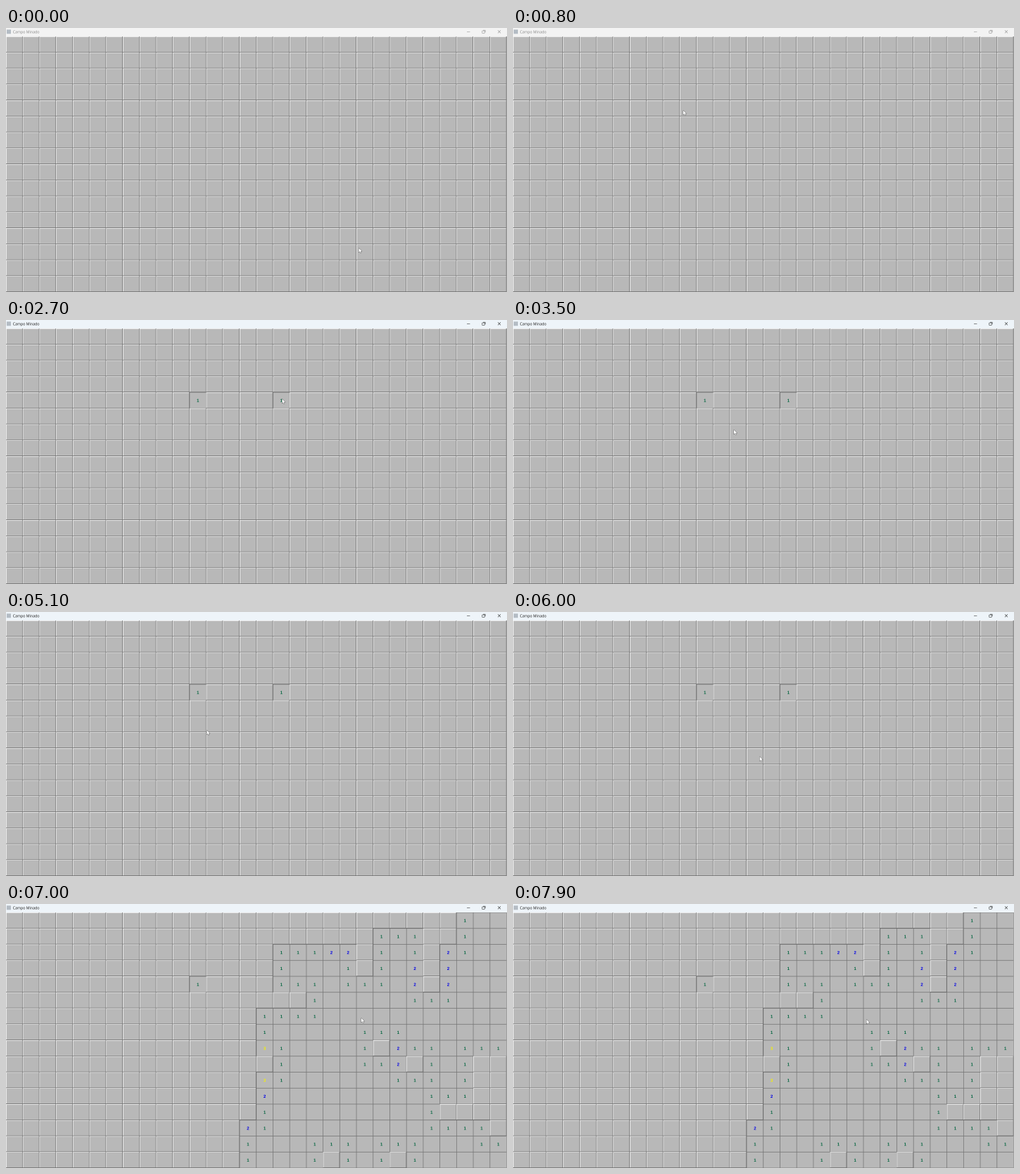
Recreate the animation shown at these times as an HTML page with a canvas. Size 712 by 376 pixels, loop 8 s.

```html
<!DOCTYPE html>
<html lang="pt">
<head>
<meta charset="utf-8">
<title>Campo Minado</title>
<style>
  html, body { margin: 0; width: 100%; height: 100%; overflow: hidden; background: #b8b8b8; }
  canvas { display: block; width: 712px; height: 376px; }
</style>
</head>
<body>
<canvas id="stage" width="712" height="376"></canvas>
<script>
const WIDTH = 712, HEIGHT = 376, DETAIL = 4;
const LOOP = 8000, TICK = 100;
const COLS = 30, ROWS = 16, TOP = 12;
const CW = 711.5 / COLS, CH = (HEIGHT - TOP) / ROWS;
const LINE = 0.371; // one screen pixel at the stage's scale
const DIGIT_COLORS = ['', '#00643e', '#0000e6', '#f6f200'];
const FOCUS_AT = 1000;

// Drawn large and scaled down, so hairlines blend like a shrunken screen recording.
const stage = document.getElementById('stage').getContext('2d');
stage.imageSmoothingQuality = 'high';
const large = document.createElement('canvas');
large.width = WIDTH * DETAIL;
large.height = HEIGHT * DETAIL;
const ctx = large.getContext('2d');
ctx.scale(DETAIL, DETAIL);

// Mines as "column,row"; all digits and the opened area follow from them.
const MINES = new Set(('23,0 18,1 20,1 26,1 15,2 10,3 21,3 25,3 25,4 17,5 14,7 22,8 ' +
  '14,9 15,9 24,9 28,9 14,10 14,12 26,12 29,13 13,14 19,15 23,15').split(' '));
const CLICKS = [
  { at: 1100, col: 11, row: 4 },
  { at: 2700, col: 16, row: 4 },
  { at: 7000, col: 21, row: 6 }
];

// Pointer tip at the turning points: [time, x, y]
const PATH = [
  [0, 501, 313], [100, 513, 301], [500, 121, 140], [700, 215, 115],
  [900, 268, 119], [1700, 268, 119], [2000, 355.5, 122], [2200, 402, 129],
  [2600, 392, 112], [3200, 392, 112], [3500, 313.5, 156], [3800, 272, 167],
  [4200, 270.5, 162.5], [5000, 270.5, 162.5], [5100, 285, 168], [5600, 415, 168],
  [6100, 334, 215], [6300, 385, 336], [6700, 501, 168], [6800, 504.5, 162],
  [7800, 504.5, 162], [7900, 502, 164], [LOOP, 502, 164]
];

function neighbours(col, row) {
  const cells = [];
  for (let r = Math.max(0, row - 1); r <= Math.min(ROWS - 1, row + 1); r++) {
    for (let c = Math.max(0, col - 1); c <= Math.min(COLS - 1, col + 1); c++) cells.push([c, r]);
  }
  return cells;
}

const countMines = (col, row) =>
  neighbours(col, row).filter(cell => MINES.has(cell.join())).length;

// Maps each opened cell to its digit.
function openCells(t) {
  const open = new Map();
  const reveal = (col, row) => {
    const key = [col, row].join();
    if (open.has(key)) return;
    const count = countMines(col, row);
    open.set(key, count);
    if (count === 0) neighbours(col, row).forEach(cell => reveal(...cell));
  };
  CLICKS.filter(click => t >= click.at).forEach(({ col, row }) => reveal(col, row));
  return open;
}

function pointerAt(t) {
  const i = PATH.findIndex(p => p[0] > t);
  const [t0, x0, y0] = PATH[i - 1], [t1, x1, y1] = PATH[i];
  const k = (t - t0) / (t1 - t0);
  return [x0 + (x1 - x0) * k, y0 + (y1 - y0) * k];
}

function rect(x, y, w, h, color) {
  ctx.fillStyle = color;
  ctx.fillRect(x, y, w, h);
}

function text(string, x, y, font, color, align) {
  ctx.font = font;
  ctx.fillStyle = color;
  ctx.textAlign = align;
  ctx.fillText(string, x, y);
}

function line(points, color) {
  ctx.beginPath();
  points.forEach(([x, y]) => ctx.lineTo(x, y));
  ctx.strokeStyle = color;
  ctx.lineWidth = 0.5;
  ctx.stroke();
}

function drawEdges(x, y, size, topLeft, bottomRight) {
  rect(x + CW - size, y, size, CH, bottomRight);
  rect(x, y + CH - size, CW, size, bottomRight);
  rect(x, y, size, CH - size, topLeft);
  rect(x, y, CW - size, size, topLeft);
}

function drawBoard(t) {
  const open = openCells(t);
  for (let row = 0; row < ROWS; row++) {
    for (let col = 0; col < COLS; col++) {
      const x = col * CW, y = TOP + row * CH;
      const count = open.get([col, row].join());
      if (count === undefined) {
        drawEdges(x, y, 2 * LINE, '#fafafa', '#6a6a6a');
        continue;
      }
      drawEdges(x, y, LINE, '#707070', '#707070');
      if (count) {
        text(count, x + CW / 2, y + CH / 2 + 2.4,
          'bold 6px "Liberation Sans", sans-serif', DIGIT_COLORS[count], 'center');
      }
    }
  }
}

function drawTitleBar(active) {
  const ink = active ? '#141414' : '#858585';
  rect(0, 0, WIDTH, TOP, active ? '#eef4f9' : '#f3f3f3');
  rect(1, 2.3, 6, 6, '#b4bcc4');
  text('Campo Minado', 9.7, 7.4, '5.3px "Open Sans", sans-serif', ink, 'left');
  line([[655, 5.3], [659.4, 5.3]], ink);
  line([[676.8, 4], [680.1, 4], [680.1, 7.3], [676.8, 7.3], [676.8, 4]], ink);
  line([[678, 3.1], [681.1, 3.1], [681.1, 6.2]], ink);
  line([[699, 3.3], [703, 7.3]], ink);
  line([[703, 3.3], [699, 7.3]], ink);
}

function drawPointer([x, y]) {
  const outline = [[0, 0], [0, 6.2], [1.4, 5], [2.4, 7.2], [3.4, 6.8], [2.5, 4.7], [4.4, 4.6], [0, 0]]
    .map(([dx, dy]) => [x + dx + 0.4, y + dy + 0.3]);
  line(outline, '#1c1c1c');
  ctx.fillStyle = '#fff';
  ctx.fill();
}

function draw(t) {
  rect(0, 0, WIDTH, HEIGHT, '#b8b8b8');
  drawBoard(t);
  drawTitleBar(t >= FOCUS_AT);
  drawPointer(pointerAt(t));
  stage.drawImage(large, 0, 0, WIDTH, HEIGHT);
}

const start = performance.now();
let lastTick = -1;
function loop() {
  const tick = Math.floor((performance.now() - start) % LOOP / TICK);
  if (tick !== lastTick) draw(tick * TICK);
  lastTick = tick;
  requestAnimationFrame(loop);
}
loop();
</script>
</body>
</html>
```
